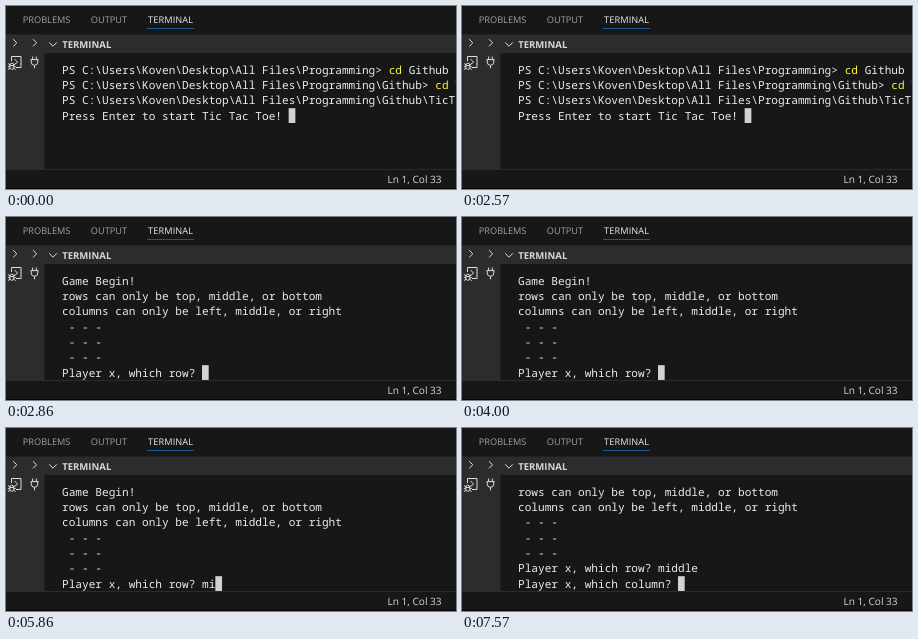
Write an HTML page that moves like this. It is 450 px wide and 183 px high and loops after 8 s.

```html
<!DOCTYPE html>
<html lang="en">
<head>
<meta charset="utf-8">
<title>Tic Tac Toe in a terminal</title>
<style>
  html, body { margin: 0; width: 100%; height: 100%; overflow: hidden; background: #181818; }
  svg { display: block; width: 100vw; height: 100vh; }
  text { white-space: pre; text-rendering: geometricPrecision; fill: #d8d8d8; }
  .ui { font: 9.2px "Open Sans", "Noto Sans", sans-serif; }
  .ui .idle { fill: #a2a2a2; }
  .ui .active { fill: #ececec; letter-spacing: .12px; }
  .ui .head { font-weight: 700; font-size: 9.55px; }
  .ui .status { font-size: 10.1px; }
  .term text { font: 500 11.111px "Noto Sans Mono", "DejaVu Sans Mono", monospace; fill: #ebebeb; }
  .term .cmd { fill: #fbf443; }
  .icon { fill: none; stroke: #dedede; stroke-width: 1; }
</style>
</head>
<body>
<svg viewBox="0 0 450 183" preserveAspectRatio="none">
  <rect width="450" height="183" fill="#171718"/>
  <path d="M0 28.500H450V47H38.500V163H0Z" fill="#2c2b2d"/>
  <rect y="163" width="450" height="1" fill="#2b2b2b"/>
  <rect y="182" width="450" height="1" fill="#050505"/>
  <rect x="141" y="22" width="47" height="1" fill="#145a96"/>

  <g class="ui">
    <text class="idle" x="16.8" y="16.8">PROBLEMS</text>
    <text class="idle" x="84.8" y="16.8">OUTPUT</text>
    <text class="active" x="142" y="16.8">TERMINAL</text>
    <text class="head" x="56.2" y="41.800">TERMINAL</text>
    <text class="status" x="381.5" y="177.2">Ln 1, Col 33</text>
  </g>

  <g class="icon">
    <path d="M7.200 33.200l3.600 3.600-3.600 3.600M27 33.200l3.600 3.600-3.600 3.600M43.200 36.400l3.800 3.800 3.800-3.800"/>
    <!-- debug console -->
    <path d="M5.500 55V50.500H15V61.500H10M8.500 53l3 3-2.500 2.500"/>
    <path d="M3.800 59.500a2 2.300 0 0 1 4 0v1.500a2 2.300 0 0 1-4 0zM3.800 59.500h4M2 57.500l2 1.500M9.600 57.500l-2 1.500M1.800 60.700h2M7.800 60.700h2M2 63.600l2-1.400M9.600 63.600l-2-1.400"/>
    <!-- plug -->
    <path d="M26.700 50.500v3M30.300 50.500v3M24.500 53.600H32.500M25.200 54v2a3.300 3.300 0 0 0 6.600 0V54M28.500 59.300v3"/>
  </g>

  <g class="term">
    <rect id="cursor" width="6.7" height="14.8" fill="#d2d2d2"/>
    <g id="lines"></g>
  </g>
</svg>

<script>
const LOOP = 8000, LEFT = 56, CELL = 6.6667, ROW = 15.33;
const START = 2860, TYPE = 5710, KEY = 143, ENTER = 6860;
const ANSWER = "middle";

const home = "PS C:\\Users\\Koven\\Desktop\\All Files\\Programming";
const intro = [
  home + "> \tcd\t Github",
  home + "\\Github> \tcd\t TicTacToe",
  home + "\\Github\\TicTacToe> ",
  "Press Enter to start Tic Tac Toe! "
];
const game = [
  "Game Begin!",
  "rows can only be top, middle, or bottom",
  "columns can only be left, middle, or right",
  " - - -", " - - -", " - - -",
  "Player x, which row? "
];

const linesBox = document.getElementById("lines");
const cursor = document.getElementById("cursor");
let shown = "";

function screenAt(t) {
  if (t < START) return intro;
  const count = Math.max(0, Math.min(ANSWER.length, Math.floor((t - TYPE) / KEY) + 1));
  const lines = game.slice();
  lines[6] += ANSWER.slice(0, count);
  return t < ENTER ? lines : [...lines.slice(1), "Player x, which column? "];
}

// Tabs in a line surround the part in the command colour.
function addLine(line, row) {
  const text = document.createElementNS("http://www.w3.org/2000/svg", "text");
  text.setAttribute("x", LEFT);
  text.setAttribute("y", 67.6 + row * ROW);
  line.split("\t").forEach((part, i) => {
    const span = document.createElementNS("http://www.w3.org/2000/svg", "tspan");
    if (i === 1) span.setAttribute("class", "cmd");
    span.textContent = part;
    text.append(span);
  });
  linesBox.append(text);
}

function draw(t) {
  const lines = screenAt(t);
  const key = lines.join("\n");
  if (key === shown) return;
  shown = key;
  linesBox.replaceChildren();
  lines.forEach(addLine);
  const last = lines.length - 1;
  cursor.setAttribute("x", LEFT + lines[last].length * CELL);
  cursor.setAttribute("y", 56.2 + last * ROW);
}

const begin = performance.now();
function tick() {
  draw((performance.now() - begin) % LOOP);
  requestAnimationFrame(tick);
}
tick();
</script>
</body>
</html>
```
